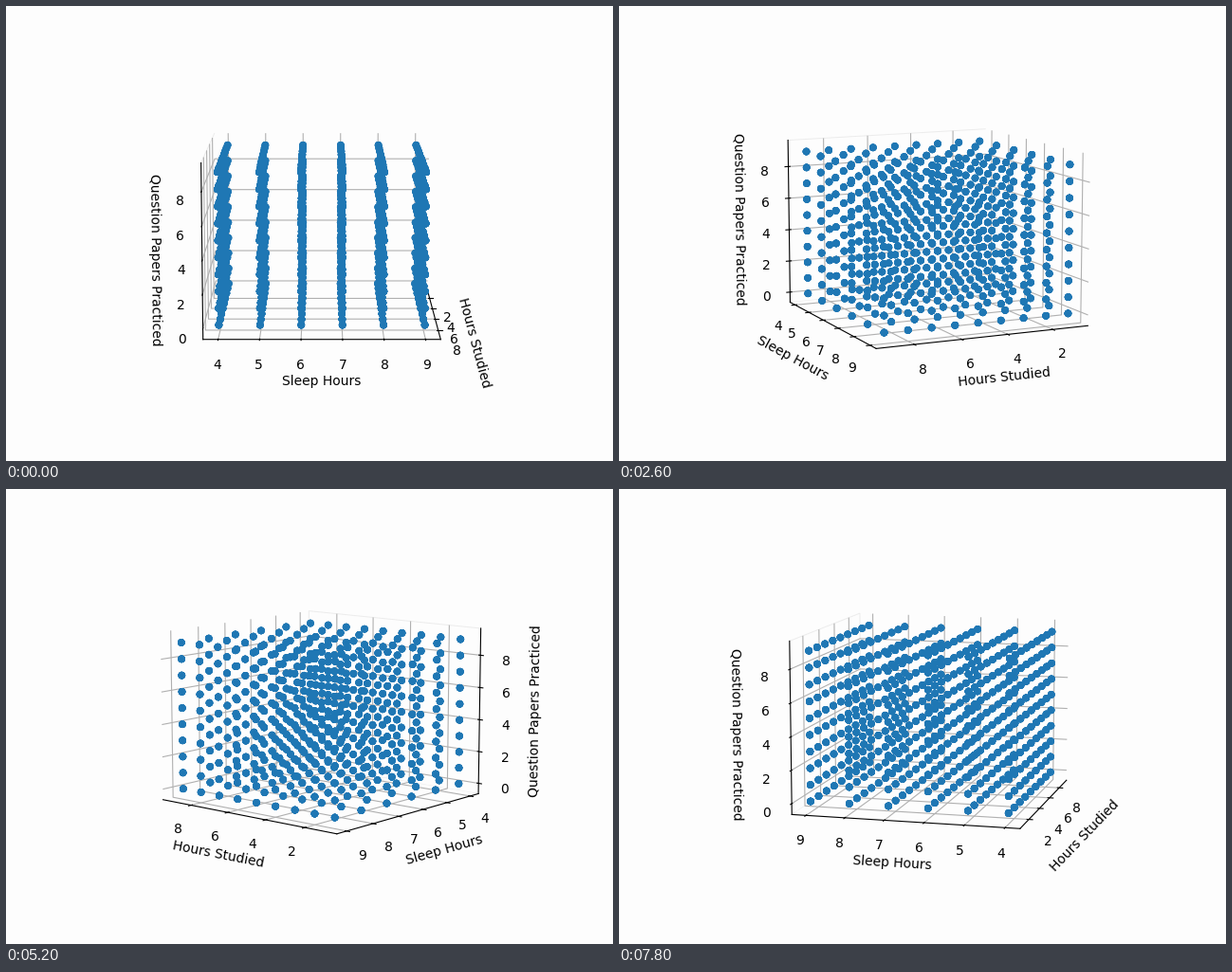
Animation of 640 by 480 pixels, one loop 8 s. Source, as a matplotlib script:

```python
import itertools

import matplotlib.pyplot as plt
import numpy as np
from matplotlib.animation import FuncAnimation

FRAMES = 40
STEP = 5          # degrees turned per frame
REPEATS = 12      # students sharing each combination of values
BACK = "#fdfdfd"
PANE_EDGE = "#ececec"


def limits(lo, hi):
    """Data range with the usual 5% margin plus a small view margin."""
    pad = (hi - lo) * (0.05 + 1.1 / 48)
    return lo - pad, hi + pad


def azimuth(i):
    # A hair off the right angles, so the choice of back walls is never a tie.
    return STEP * i * (1 - 1e-5) + 1e-4


fig = plt.figure(figsize=(6.4, 4.8), dpi=100, facecolor=BACK)
ax = fig.add_subplot(projection="3d", facecolor=BACK)

ranges = [(1, 9), (4, 9), (0, 9)]
grid = itertools.product(*(range(lo, hi + 1) for lo, hi in ranges))
points = np.repeat(np.array(list(grid), float), REPEATS, axis=0)
ax.scatter(*points.T, color="#1f77b4")

ax.set(
    xlabel="Hours Studied",
    ylabel="Sleep Hours",
    zlabel="Question Papers Practiced",
    xlim=limits(*ranges[0]),
    ylim=limits(*ranges[1]),
    zlim=limits(*ranges[2]),
    xticks=range(2, 9, 2),
    yticks=range(4, 10),
    zticks=range(0, 9, 2),
)

for axis in (ax.xaxis, ax.yaxis, ax.zaxis):
    axis.pane.set(facecolor=BACK, edgecolor="none", alpha=None)
ax.yaxis.pane.set(edgecolor=PANE_EDGE, linewidth=0.7)


def update(i):
    ax.view_init(elev=10, azim=azimuth(i))
    return ()


anim = FuncAnimation(fig, update, frames=FRAMES, interval=200, repeat=True)
plt.show()
```
